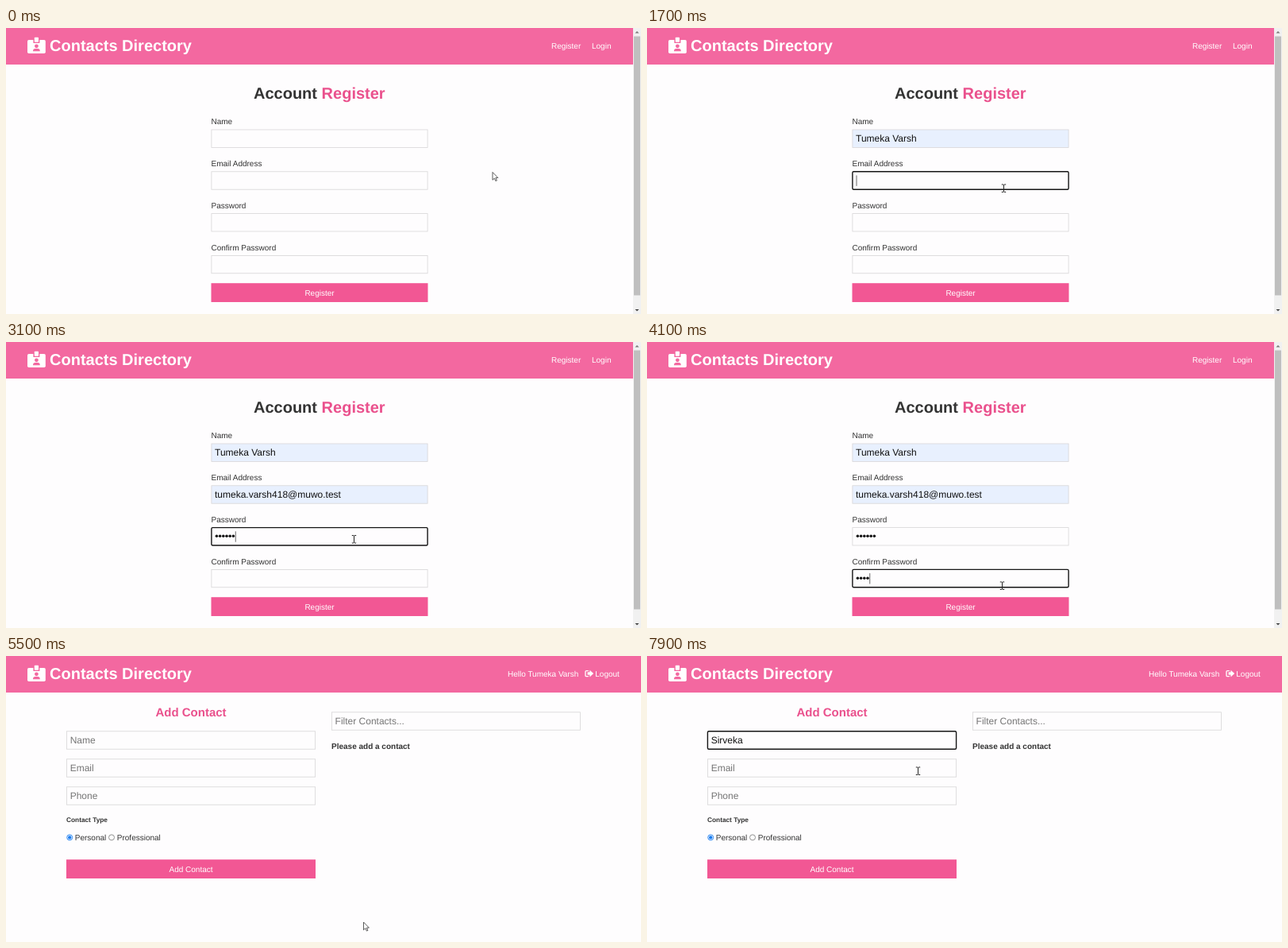
Write an HTML page that moves like this. It is 800 px wide and 360 px high and loops after 8 s.

```html
<!DOCTYPE html>
<html lang="en">
<head>
<meta charset="utf-8">
<title>Contacts Directory</title>
<style>
  html, body { margin: 0; width: 100%; height: 100%; overflow: hidden; background: #fefdfe; }
  svg { display: block; width: 800px; height: 360px; }
  text { font-family: "Liberation Sans", Arial, sans-serif; text-rendering: geometricPrecision; white-space: pre; }
</style>
</head>
<body>
<svg id="stage" viewBox="0 0 800 360" xmlns="http://www.w3.org/2000/svg"></svg>
<script>
const LOOP = 8000, TICK = 100, PAGE_SWITCH = 5500;
const PAPER = '#fefdfe', HEADER = '#f368a0', PINK = '#f25794', HOVER = '#f778a8',
      TITLE = '#ea518d', INK = '#333', HINT = '#757575', AUTOFILL = '#e8f0fe';
const USER = 'Tumeka Varsh', EMAIL = 'tumeka.varsh418@muwo.test', CONTACT = 'Sirveka';

const NAME_FILL = 1400, EMAIL_FILL = 2000;
const FOCUS = [[1100, 0], [1600, 1], [2400, 2], [3500, 3], [4900, -1]];
const PASS_KEYS = [2500, 2600, 2700, 2800, 3000, 3100];
const CONFIRM_KEYS = [3600, 3700, 3900, 4100, 4200, 4200];
const CONTACT_KEYS = [6700, 7000, 7200, 7400, 7600, 7700, 7800];
const CONTACT_FOCUS = 6000;

// Pointer hot spot: time, x, y
const PATH = [[0, 613, 181.5], [500, 613, 181.5], [1000, 446, 138], [1400, 446, 138],
  [1600, 449.5, 196.5], [2100, 449.5, 196.5], [2400, 438.5, 243], [3100, 438.5, 243],
  [3400, 447.5, 301.5], [4400, 447.5, 301.5], [4700, 450.5, 335], [5500, 450.5, 335],
  [5900, 333.5, 116], [7600, 333.5, 116], [7900, 341.5, 139.5]];

const FORM = { x: 258.5, w: 273, h: 23, ys: [127.7, 180.5, 233.3, 286.1] };
const CARD = { x: 76, w: 314, h: 23, ys: [94.5, 129.5, 164.5] };

const count = (keys, t) => keys.filter(k => k <= t).length;

function text(x, y, str, size = 10, fill = INK, extra = '') {
  return `<text x="${x}" y="${y}" font-size="${size}" fill="${fill}" ${extra}>${str}</text>`;
}
function rect(x, y, w, h, fill, extra = '') {
  return `<rect x="${x}" y="${y}" width="${w}" height="${h}" fill="${fill}" ${extra}/>`;
}
const path = (d, fill, extra = '') => `<path d="${d}" fill="${fill}" ${extra}/>`;
const circle = (x, y, r, fill, extra = '') => `<circle cx="${x}" cy="${y}" r="${r}" fill="${fill}" ${extra}/>`;
const BOLD = 'font-weight="700"', MIDDLE = 'text-anchor="middle"';

function field(x, y, w, h, focused, fill = PAPER) {
  const line = focused ? 'stroke="#151515" stroke-width="1.4" rx="1.5"' : 'stroke="#d8d6d8" stroke-width="0.8"';
  return rect(x + 0.4, y + 0.3, w - 0.8, h - 0.6, fill, line);
}
function button(x, y, w, h, label, fill) {
  return rect(x, y, w, h, fill) + text(x + w / 2, y + 15.7, label, 10, '#fff', MIDDLE);
}
function dots(n, y) {
  let out = '';
  for (let i = 0; i < n; i++) out += circle(265.4 + 4.2 * i, y, 1.75, '#111');
  return out;
}

function header(width) {
  return rect(0, 0, width, 46, HEADER)
    + rect(27, 15, 22.8, 17, '#fff', 'rx="1.8"')
    + rect(34.4, 14, 8, 5, HEADER)
    + rect(35.8, 11.8, 5.2, 6, '#fff', 'rx="0.8"')
    + circle(38.4, 22.8, 2.4, HEADER)
    + path('M34 29.3Q34 26 36.8 26H40Q42.8 26 42.8 29.3Z', HEADER)
    + text(55, 29, 'Contacts Directory', 20, '#fff', BOLD);
}

function scrollbar() {
  return rect(790, 0, 10, 360, '#f1f1f1') + rect(791, 10.5, 8, 326, '#bfbfbf')
    + path('M792.5 6.5L795 4L797.5 6.5Z', '#777')
    + path('M792.5 354L795 356.5L797.5 354Z', '#444');
}

function registerPage(t, pointer) {
  const active = FOCUS.filter(f => f[0] <= t).pop() || [0, -1];
  const focus = active[1];
  const pass = count(PASS_KEYS, t), confirm = count(CONFIRM_KEYS, t);
  const filled = [t >= NAME_FILL, t >= EMAIL_FILL];
  let out = header(790) + text(687, 26, 'Register', 10, '#fff') + text(738, 26, 'Login', 10, '#fff')
    + text(312, 88.5, 'Account', 20, INK, BOLD) + text(397.6, 88.5, 'Register', 20, TITLE, BOLD);

  ['Name', 'Email Address', 'Password', 'Confirm Password'].forEach((label, i) => {
    const y = FORM.ys[i];
    out += text(258.5, y - 6.5, label)
      + field(FORM.x, y, FORM.w, FORM.h, focus === i, filled[i] ? AUTOFILL : PAPER);
  });
  if (filled[0]) out += text(263, 143.3, USER, 12, '#111');
  if (filled[1]) out += text(263, 196, EMAIL, 12, '#111');
  out += dots(pass, 244.3) + dots(confirm, 297.2);

  const keys = [[], [], PASS_KEYS, CONFIRM_KEYS][focus] || [];
  const last = keys.filter(k => k <= t).pop() || active[0];
  const hasText = filled[focus] === true;
  if (focus >= 0 && !hasText && (t - last) % 1000 < 500) {
    const x = 263.6 + 4.2 * count(keys, t);
    out += rect(x, FORM.ys[focus] + 5, 0.8, 13.4, '#444');
  }
  return out + button(258.5, 321.2, 273, 23.8, 'Register', pointer.kind === 'hand' ? HOVER : PINK) + scrollbar();
}

function logoutIcon() {
  return path('M733.4 18.6H731.2Q730 18.6 730 19.8V24.4Q730 25.6 731.2 25.6H733.4', 'none',
      'stroke="#fff" stroke-width="1.3" stroke-linecap="round"')
    + path('M732.8 20.6H735.6V18.2L740 22.1L735.6 26V23.6H732.8Z', '#fff', 'stroke="#fff" stroke-width="0.4" stroke-linejoin="round"');
}

function contactsPage(t) {
  const typed = CONTACT.slice(0, count(CONTACT_KEYS, t));
  let out = header(800) + text(632, 26, 'Hello ' + USER, 10, '#fff')
    + logoutIcon() + text(742.3, 26, 'Logout', 10, '#fff')
    + text(233, 75.6, 'Add Contact', 15, TITLE, BOLD + ' ' + MIDDLE);

  ['Name', 'Email', 'Phone'].forEach((hint, i) => {
    const y = CARD.ys[i], value = i === 0 && typed;
    out += field(CARD.x, y, CARD.w, CARD.h, i === 0 && t >= CONTACT_FOCUS)
      + text(80.7, y + 15.6, value || hint, 12, value ? '#111' : HINT);
  });
  return out + text(76, 208.6, 'Contact Type', 8.3, INK, BOLD)
    + circle(80.2, 228.4, 3.5, '#fff', 'stroke="#1a7cf0" stroke-width="0.9"') + circle(80.2, 228.4, 2.2, '#1a7cf0')
    + text(86.8, 232.3, 'Personal')
    + circle(133, 228.4, 3.5, '#fff', 'stroke="#767676" stroke-width="0.8"')
    + text(139.8, 232.3, 'Professional')
    + button(76, 256.2, 314, 23.8, 'Add Contact', PINK)
    + field(410, 70.5, 314, 23, false) + text(414.6, 86.1, 'Filter Contacts...', 12, HINT)
    + text(410, 117, 'Please add a contact', 10, INK, BOLD);
}

function pointerAt(t) {
  let i = 0;
  while (i < PATH.length - 2 && t >= PATH[i + 1][0]) i++;
  const [t0, x0, y0] = PATH[i], [t1, x1, y1] = PATH[i + 1];
  const u = Math.min(1, (t - t0) / (t1 - t0)), e = u * u * (3 - 2 * u);
  const x = x0 + (x1 - x0) * e, y = y0 + (y1 - y0) * e;
  const first = t < PAGE_SWITCH, box = first ? FORM : CARD;
  const inside = x > box.x && x < box.x + box.w;
  let kind = 'arrow';
  if (inside && box.ys.some(top => y >= top && y <= top + box.h)) kind = 'beam';
  const top = first ? 321 : 256;
  if (inside && y >= top && y <= top + 24) kind = 'hand';
  return { x, y, kind };
}

const CURSORS = {
  arrow: path('M0 0V9.8L2.3 7.7L3.9 11.1L5.4 10.4L3.9 7.1H6.9Z', '#fff', 'stroke="#333" stroke-width="0.8" stroke-linejoin="round"'),
  beam: path('M-2.7 0.5H-0.8L0 1L0.8 0.5H2.7M0 1V9.5M-2.7 10H-0.8L0 9.5L0.8 10H2.7', 'none', 'stroke="#222" stroke-width="1"'),
  hand: path('M-1 1Q0 -0.6 1 1V4.8Q2.3 3.9 2.7 5.2Q4 4.6 4.3 5.8Q5.6 5.4 5.6 6.9V9Q5.2 10.5 4.4 11.2V12.6H-0.6V11.4L-3.4 7.6Q-3.6 6.3 -2.4 6.4L-1 7.8Z',
    '#fff', 'stroke="#222" stroke-width="0.8" stroke-linejoin="round"')
};

const stage = document.getElementById('stage');

function render(t) {
  const pointer = pointerAt(t);
  const page = t < PAGE_SWITCH ? registerPage(t, pointer) : contactsPage(t);
  stage.innerHTML = rect(0, 0, 800, 360, PAPER) + page
    + `<g transform="translate(${pointer.x} ${pointer.y})">${CURSORS[pointer.kind]}</g>`;
}

let shown = -1;
function loop() {
  const t = Math.floor(performance.now() % LOOP / TICK) * TICK;
  if (t !== shown) render(shown = t);
  requestAnimationFrame(loop);
}
loop();
</script>
</body>
</html>
```
